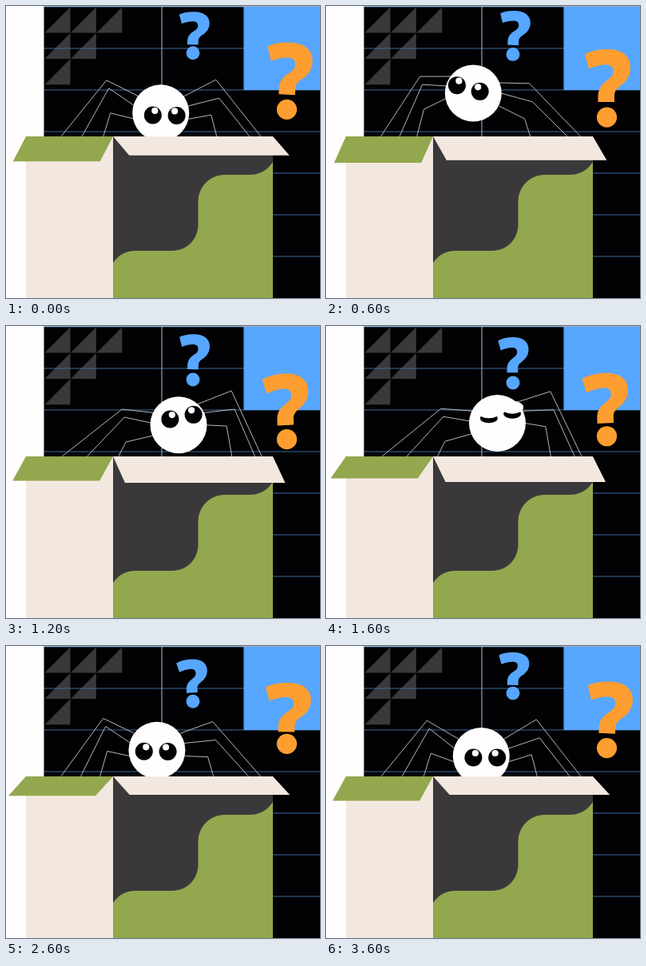
Animation of 393 by 365 pixels, one loop 3700 ms. Source, as an HTML page with a canvas:

```html
<!DOCTYPE html>
<html lang="en">
<head>
<meta charset="utf-8">
<title>Curious spider in a box</title>
<style>
html, body { margin: 0; width: 100%; height: 100%; overflow: hidden; background: #fffdfe; }
canvas { display: block; }
</style>
</head>
<body>
<canvas id="stage" width="393" height="365"></canvas>
<script>
const ctx = document.getElementById('stage').getContext('2d');
const LOOP = 3700, STEP = 100, DEG = Math.PI / 180;
const WHITE = '#fffdfe', BLACK = '#020103', DARK = '#3a383b', CREAM = '#f3e8df',
      GREEN = '#93a74e', BLUE = '#57a6ff', ORANGE = '#ff9e30';

// Key poses: body centre, gaze offset of the eyes, head tilt in degrees.
const POSES = [
  { at: 0, x: 193.7, y: 133.7, gazeX: 5, gazeY: 3, tilt: 1 },
  { at: 600, x: 184.3, y: 109, gazeX: -6, gazeY: -6, tilt: 15 },
  { at: 1200, x: 216, y: 123.7, gazeX: 4, gazeY: -10, tilt: -11 },
  { at: 1600, x: 214.5, y: 121.5, gazeX: 4, gazeY: -9, tilt: -11 },
  { at: 2100, x: 180.7, y: 118.7, gazeX: -7.7, gazeY: 0, tilt: 1 },
  { at: 3000, x: 194.8, y: 138.7, gazeX: 4, gazeY: 2, tilt: 0 },
  { at: 3600, x: 194.3, y: 137.5, gazeX: 5, gazeY: 2, tilt: 0 }
];
// From the outer to the inner pair: hip offset, how far the foot follows the
// body sideways, and the resting foot x, knee x, knee y of each side.
const LEG_PAIRS = [
  { hip: [28, -21], follow: .05, left: [69, 126, 93], right: [319, 263, 92] },
  { hip: [33, -9], follow: .3, left: [95, 129, 103], right: [305, 267, 115] },
  { hip: [35, 7], follow: .85, left: [122, 131, 134], right: [264, 257, 136] }
];

const HOOK = new Path2D('M-27.5-74.5C-20-78.5-10-80.5 1-80.5C19-80.5 29.5-72 29.5-59' +
  'C29.5-48 24-41.5 17-36.5C11-32 9.5-29 9.5-24V-17H-11V-23C-11-33-7-38 1-43.5' +
  'C6-47 8-49.5 8-54C8-59 5-62-1-62C-8-62-15-60-22.5-57Z');
const WAVE = new Path2D('M334 195C327 205 318 211 305 211H274C255 211 240.5 226 240.5 245V273' +
  'C240.5 292 226 306 208 306H162C150 306 141 311 134 321V365H334Z');

const wave = (t, peak) => Math.cos(2 * Math.PI * (t - peak) / LOOP);

// Smooth periodic interpolation without overshoot.
function track(key, t) {
  const n = POSES.length;
  const value = i => POSES[(i + n) % n][key];
  const time = i => POSES[(i + n) % n].at + LOOP * Math.floor(i / n);
  const secant = i => (value(i + 1) - value(i)) / (time(i + 1) - time(i));
  const slope = i => {
    const a = secant(i - 1), b = secant(i);
    return a * b <= 0 ? 0 : 2 * a * b / (a + b);
  };
  const i = POSES.findLastIndex(pose => pose.at <= t);
  const h = time(i + 1) - time(i), u = (t - time(i)) / h, v = 1 - u;
  return value(i) * v * v * (1 + 2 * u) + value(i + 1) * u * u * (3 - 2 * u)
    + h * u * v * (slope(i) * v - slope(i + 1) * u);
}

function rect(color, x, y, w, h) {
  ctx.fillStyle = color;
  ctx.fillRect(x, y, w, h);
}

function poly(color, ...points) {
  ctx.fillStyle = color;
  ctx.beginPath();
  points.forEach(p => ctx.lineTo(...p));
  ctx.fill();
}

function oval(color, x, y, rx, ry = rx) {
  ctx.fillStyle = color;
  ctx.beginPath();
  ctx.ellipse(x, y, rx, ry, 0, 0, 2 * Math.PI);
  ctx.fill();
}

function line(color, width, ...points) {
  ctx.strokeStyle = color;
  ctx.lineWidth = width;
  ctx.beginPath();
  points.forEach(p => ctx.lineTo(...p));
  ctx.stroke();
}

function backdrop() {
  rect(WHITE, 0, 0, 393, 365);
  rect(BLACK, 47.5, 1, 346, 364);
  for (let row = 0; row < 3; row++) {
    for (let col = 0; col < 3 - row; col++) {
      const x = 48.5 + col * 32.4, y = 1.5 + row * 32.4;
      poly(DARK, [x, y + 32], [x + 32, y], [x + 32, y + 32]);
    }
  }
  for (let y = 1; y < 365; y += 52) line('#3b6c9f', 1.2, [47.5, y], [393, y]);
  line('#a3adb5', 1.1, [195, 1], [195, 163]);
  rect(BLUE, 297.5, 1, 96, 104);
}

function questionMark(t, color, x, y, size, peak) {
  const stretch = wave(t, peak - 570);
  ctx.save();
  ctx.translate(x, y + 10.5 * size * wave(t, peak));
  ctx.scale(size, size);
  oval(color, 0, 0, 12.6);
  ctx.rotate(3 * DEG * wave(t, peak - 1380));
  ctx.translate(0, -1.5 * stretch);
  ctx.scale(1, 1 + .04 * stretch);
  ctx.fill(HOOK);
  ctx.restore();
}

function leg({ hip: [hx, hy], follow }, [foot, kx, ky], side, x, y, tilt) {
  const a = tilt * DEG, c = Math.cos(a), s = Math.sin(a), shift = x - 194;
  line('#cbc9cb', .9, [foot + follow * shift, 163],
    [kx + .87 * shift, ky - side * .5 * shift],
    [x + side * hx * c - hy * s, y + side * hx * s + hy * c]);
}

function spider(t) {
  const [x, y, gazeX, gazeY, tilt] = ['x', 'y', 'gazeX', 'gazeY', 'tilt'].map(key => track(key, t));
  for (const pair of LEG_PAIRS) {
    leg(pair, pair.left, -1, x, y, Math.min(tilt, 0));
    leg(pair, pair.right, 1, x, y, tilt);
  }
  oval(WHITE, x, y, 35.5);

  const blink = Math.max(0, 1 - Math.abs(t - 1600) / 200);
  for (const side of [-1, 1]) {
    const ex = x + gazeX + side * 14.9 * Math.cos(tilt * DEG);
    const ey = y + gazeY + side * 14.9 * Math.sin(tilt * DEG);
    oval(BLACK, ex, ey, 11, 11 - 5 * blink);
    if (blink) oval(WHITE, ex, ey - 8, 14, 8 * blink);
    if (blink < .4) oval(WHITE, ex - side * 2.5, ey - 5.5, 4.1);
  }
}

function box(t) {
  rect(CREAM, 25, 163, 109, 202);
  rect(DARK, 134, 163, 200, 202);
  ctx.fillStyle = GREEN;
  ctx.fill(WAVE);

  const l = wave(t, 550), lx = 6.5 + 3.7 * l, ly = 191.5 + 4.5 * l;
  poly(GREEN, [25, 163], [134, 163], [lx + 109, ly], [lx, ly]);

  const r = wave(t, 1250), rx = 152.4 - 3.5 * r, ry = 190 + 6 * r;
  poly(CREAM, [134, 163], [334, 163], [rx + 200.5, ry], [rx, ry]);
}

function draw(now) {
  const t = Math.floor(now % LOOP / STEP) * STEP;
  backdrop();
  questionMark(t, BLUE, 234, 65.5, .67, 2000);
  questionMark(t, ORANGE, 351.5, 131.5, 1, 1050);
  spider(t);
  box(t);
}

const start = performance.now();
function frame() {
  draw(performance.now() - start);
  requestAnimationFrame(frame);
}
frame();
</script>
</body>
</html>
```
